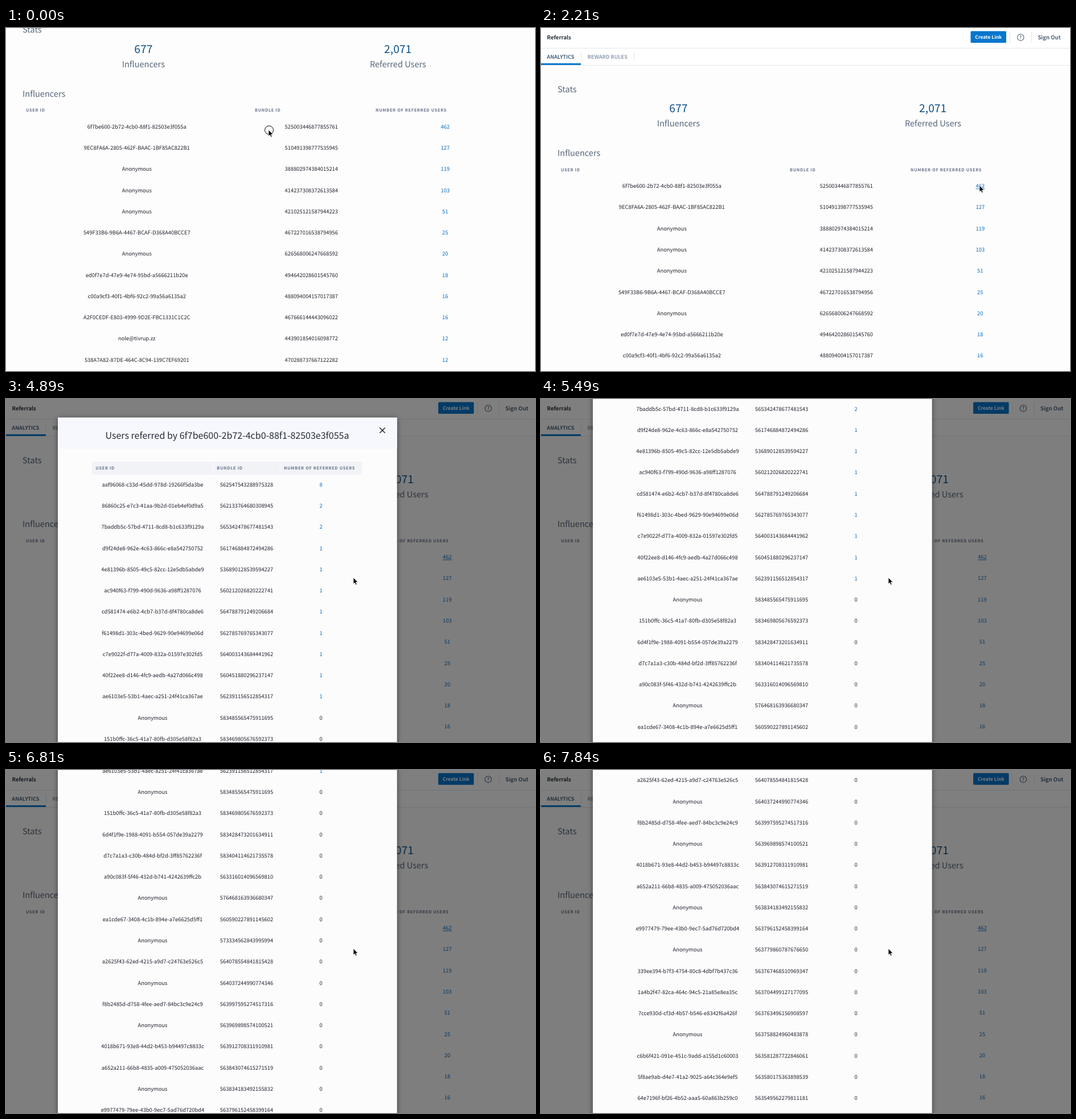
An HTML page for the animation above (7.99 s loop, 929 by 603 pixels).

```html
<!DOCTYPE html>
<html lang="en">
<head>
<meta charset="utf-8">
<title>Referrals</title>
<style>
  html, body { margin: 0; width: 100%; height: 100%; overflow: hidden; background: #fdfdfd; }
  svg { display: block; width: 929px; height: 603px; }
  text { font-family: "Noto Sans CJK JP", "Noto Sans CJK SC", "Noto Sans", sans-serif; text-rendering: geometricPrecision; white-space: pre; }
  .cell { font-size: 9.35px; fill: #20242c; text-anchor: middle; }
  .link { fill: #0b6cbf; }
  .th { font-size: 7.25px; font-weight: 700; letter-spacing: .73px; fill: #66718a; }
  .heading { font-size: 14.55px; fill: #56667a; }
  .mid { text-anchor: middle; }
  .stat { font-size: 19.3px; font-weight: 300; fill: #10508a; text-anchor: middle; }
  .title { font-size: 16px; fill: #262c38; text-anchor: middle; }
  .nav { font-size: 9.55px; font-weight: 700; fill: #4c637d; }
  .tab { font-size: 9.1px; font-weight: 700; fill: #46627f; }
  .off { fill: #8f9fb3; }
  .dark { fill: #27313d; }
  .button { font-size: 8.45px; font-weight: 700; fill: #fff; text-anchor: middle; }
  .rule { stroke: #e2e5e9; }
  #sheet { filter: drop-shadow(0 1px 4px rgba(0, 0, 0, .5)); }
</style>
</head>
<body>
<svg viewBox="0 0 929 603">
  <rect width="929" height="603" fill="#fdfdfd"/>
  <g id="page"></g>
  <rect id="shade" width="929" height="603"/>
  <g id="modal"></g>
  <g id="cursor">
    <circle id="ring" cx="1" cy=".5" r="7.5" fill="none" stroke="#000"/>
    <path d="M0 0V11.2L2.5 8.9 4.2 12.8 6.2 12 4.5 8.1H8Z" stroke="#fff" stroke-width=".8"/>
  </g>
</svg>
<script>
const LOOP = 7990, STEP = 148, ROW = 37.27;
const $ = id => document.getElementById(id);

const influencers = `6f7be600-2b72-4cb0-88f1-82503e3f055a 525003446877855761 462
9EC8FA6A-2805-462F-BAAC-1BF85AC822B1 510491398777535945 127
Anonymous 388802974384015214 119
Anonymous 414237308372613584 103
Anonymous 421025121587944223 51
549F33B6-9B6A-4467-BCAF-D368A40BCCE7 467227016538794956 25
Anonymous 626568006247668592 20
ed0f7e7d-47e9-4e74-95bd-a5666211b20e 494642028601545760 18
c00a9cf3-40f1-4bf6-92c2-99a56a6135a2 488094004157017387 16
A2F0CEDF-E803-4999-9D2E-FBC1331C1C2C 467666144443096022 16
nole@tivrup.zz 443901854016098772 12
538A7A82-87DE-464C-8C94-139C7EF69201 470288737667122282 12`;

const referred = `aaf96068-c33d-45dd-978d-19266f5da3be 562547543288975328 8
86860c25-e7c3-41aa-9b2d-01eb4ef0d9a5 562133764680308945 2
7baddb5c-57bd-4711-8cd8-b1c633f9129a 565342478677481543 2
d9f24de8-962e-4c63-866c-e8a542750752 561746884872494286 1
4e81396b-8505-49c5-82cc-12e5db5abde9 536890128539594227 1
ac940f63-f799-490d-9636-a98ff1287076 560212026820222741 1
cd581474-e6b2-4cb7-b37d-8f4780ca8de6 564788791249206684 1
f61498d1-303c-4bed-9629-90e94699e06d 562785769765343077 1
c7e9022f-d77a-4009-832a-01597e302fd5 564003143684441962 1
40f22ee8-d146-4fc9-aedb-4a27d066c498 560451880296237147 1
ae6103e5-53b1-4aec-a251-24f41ca367ae 562391156512854317 1
Anonymous 583485565475911695 0
151b0ffc-36c5-41a7-80fb-d305e58f82a3 583469805676592373 0
6d4f1f9e-1988-4091-b554-057de39a2279 583428473201634911 0
d7c7a1a3-c30b-484d-bf2d-3ff85762236f 583404114621735578 0
a90c083f-5f46-432d-b741-4242639ffc2b 563316014096569810 0
Anonymous 576468163936680347 0
ea1cde67-3408-4c1b-894e-a7e6625d5ff1 560590227891145602 0
Anonymous 573334562843995994 0
a2625f43-62ed-4215-a9d7-c24763e526c5 564078554841815428 0
Anonymous 564037244990774346 0
f8b2485d-d758-4fee-aed7-84bc3c9e24c9 563997595274517316 0
Anonymous 563969898574100521 0
4018b671-93e8-44d2-b453-b94497c8833c 563912708311910981 0
a652a211-66b8-4835-a009-475052036aac 563843074615271519 0
Anonymous 563834183492155832 0
e9977479-79ee-43b0-9ec7-5ad76d720bd4 563796152458399164 0
Anonymous 563779860787676650 0
339ee394-b7f3-4754-80c8-4dbf7b437c36 563767468510969347 0
1a4b2f47-82ca-464c-94c5-21a85e8ea35c 563704499127177095 0
7cce930d-cf3d-4b57-b546-e8342f6a426f 563763496156908597 0
Anonymous 563758824960483878 0
c6b6f421-091e-451c-9add-a155d1c60003 563581287722846061 0
5f8ae9ab-d4e7-41a2-9025-a64c364e9ef5 563580175363898539 0
64e7196f-bf26-4b52-aaa5-60a863b259c0 563549562279811181 0`;

const text = (x, y, cls, str) => `<text x="${x}" y="${y}" class="${cls}">${str}</text>`;
const line = (x1, y1, x2, y2) => `<line x1="${x1}" y1="${y1}" x2="${x2}" y2="${y2}" class="rule"/>`;
const rect = (x, y, w, h, fill, more = '') =>
  `<rect x="${x}" y="${y}" width="${w}" height="${h}" fill="${fill}" ${more}/>`;

// Returns the three columns of a table as separate strings.
function columns(data, headX, cellX, headY, firstY) {
  const rows = data.split('\n').map(row => row.split(' '));
  return ['USER ID', 'BUNDLE ID', 'NUMBER OF REFERRED USERS'].map((head, c) =>
    text(headX[c], headY, 'th', head) + rows.map((row, r) =>
      text(cellX[c], firstY + r * ROW, c === 2 && row[2] > 0 ? 'cell link' : 'cell', row[c])).join(''));
}

const [ids, bundles, counts] = columns(influencers, [35, 437, 649], [229.8, 536.3, 771.3], 251.8, 281.2);
$('page').innerHTML =
  rect(0, 0, 929, 65, '#fff') + line(0, 35.5, 929, 35.5) + line(0, 65.5, 929, 65.5) +
  text(10.5, 20, 'nav dark', 'Referrals') +
  text(10.3, 53.7, 'tab', 'ANALYTICS') + text(81.6, 53.7, 'tab off', 'REWARD RULES') +
  line(70.5, 43, 70.5, 57) + line(163.5, 43, 163.5, 57) + rect(0, 62, 70, 3, '#0a78cd') +
  `<g id="tools">${rect(754.5, 5.5, 62.5, 20.5, '#0576cd', 'rx="1.5"')}` +
    text(785.8, 19, 'button', 'Create Link') + line(823.5, 6, 823.5, 26) + line(861.5, 6, 861.5, 26) +
    '<circle cx="842.3" cy="16.4" r="5.7" fill="none" stroke="#4c637d" stroke-width="1.1"/>' +
    text(842.3, 19.4, 'nav mid" style="font-size:7.5px', '?') + text(872.4, 20, 'nav', 'Sign Out') + '</g>' +
  text(29, 112.6, 'heading', 'Stats') + text(241.3, 148.3, 'stat', '677') +
  text(241.3, 173.2, 'heading mid', 'Influencers') + text(29, 225.2, 'heading', 'Influencers') +
  ids + bundles +
  `<g id="wide">${text(688.2, 148.3, 'stat', '2,071')}${text(688.4, 173.2, 'heading mid', 'Referred Users')}${counts}` +
    rect(763.5, 282.4, 15.6, .9, '#0b6cbf', 'id="underline"') + '</g>';

$('modal').innerHTML =
  rect(91, 35, 595.7, 1500, '#fcfcfd', 'id="sheet"') +
  `<g id="tint">${rect(91, 35, 595.7, 55, '#f7f8fd')}${rect(151, 112.5, 212.7, 23, '#f1f3f7')}` +
    rect(364.5, 112.5, 116.5, 23, '#f1f3f7') + rect(482, 112.5, 143, 23, '#f1f3f7') + '</g>' +
  text(388.5, 72.2, 'title', 'Users referred by 6f7be600-2b72-4cb0-88f1-82503e3f055a') +
  '<path d="M656.3 52.7l9.4 9.4m0-9.4l-9.4 9.4" stroke="#1c2026" stroke-width="1.4"/>' +
  columns(referred, [157.4, 370.3, 488], [257.5, 422.5, 553], 126.8, 156.1).join('');

// Keys are [step, value, value...], joined by straight lines.
const scrollKeys = [[32, 0], [33, 2.3], [35, 60], [38, 285], [41, 427], [44, 502], [46, 524],
                    [48, 590], [51, 770], [53, 843]];
const cursorKeys = [[0, 461, 179], [6, 462, 189], [7, 462, 189], [9, 505, 201], [11, 640, 245],
                    [13, 755, 284], [15, 770, 277], [27, 770, 277], [28, 722, 288], [29, 645, 307], [30, 610, 314]];

function track(keys, n) {
  const i = keys.findIndex(key => key[0] > n);
  if (i < 0) return keys.at(-1).slice(1);
  if (i === 0) return keys[0].slice(1);
  const a = keys[i - 1], b = keys[i], k = (n - a[0]) / (b[0] - a[0]);
  return a.slice(1).map((v, j) => v + (b[j + 1] - v) * k);
}
const smooth = k => k * k * (3 - 2 * k);
const move = (id, x, y) => $(id).setAttribute('transform', `translate(${x} ${y})`);
const show = (id, opacity) => $(id).setAttribute('opacity', +opacity);

function draw() {
  const n = Math.floor((performance.now() % LOOP + 10) / STEP);
  const open = Math.min(1, Math.max(0, (n - 19) / 2));

  move('page', 0, -104.4 * (1 - smooth(Math.min(1, n / 6))));
  move('tools', n >= 20 ? 4.6 : 0, 0);
  move('wide', n >= 20 ? 3.6 : 0, 0);
  move('modal', 0, -track(scrollKeys, n)[0]);
  move('cursor', ...track(cursorKeys, n));
  show('shade', open * .5);
  show('modal', open);
  show('tint', n >= 33);
  show('underline', n >= 15);
  show('ring', n === 0);
  requestAnimationFrame(draw);
}
draw();
</script>
</body>
</html>
```
